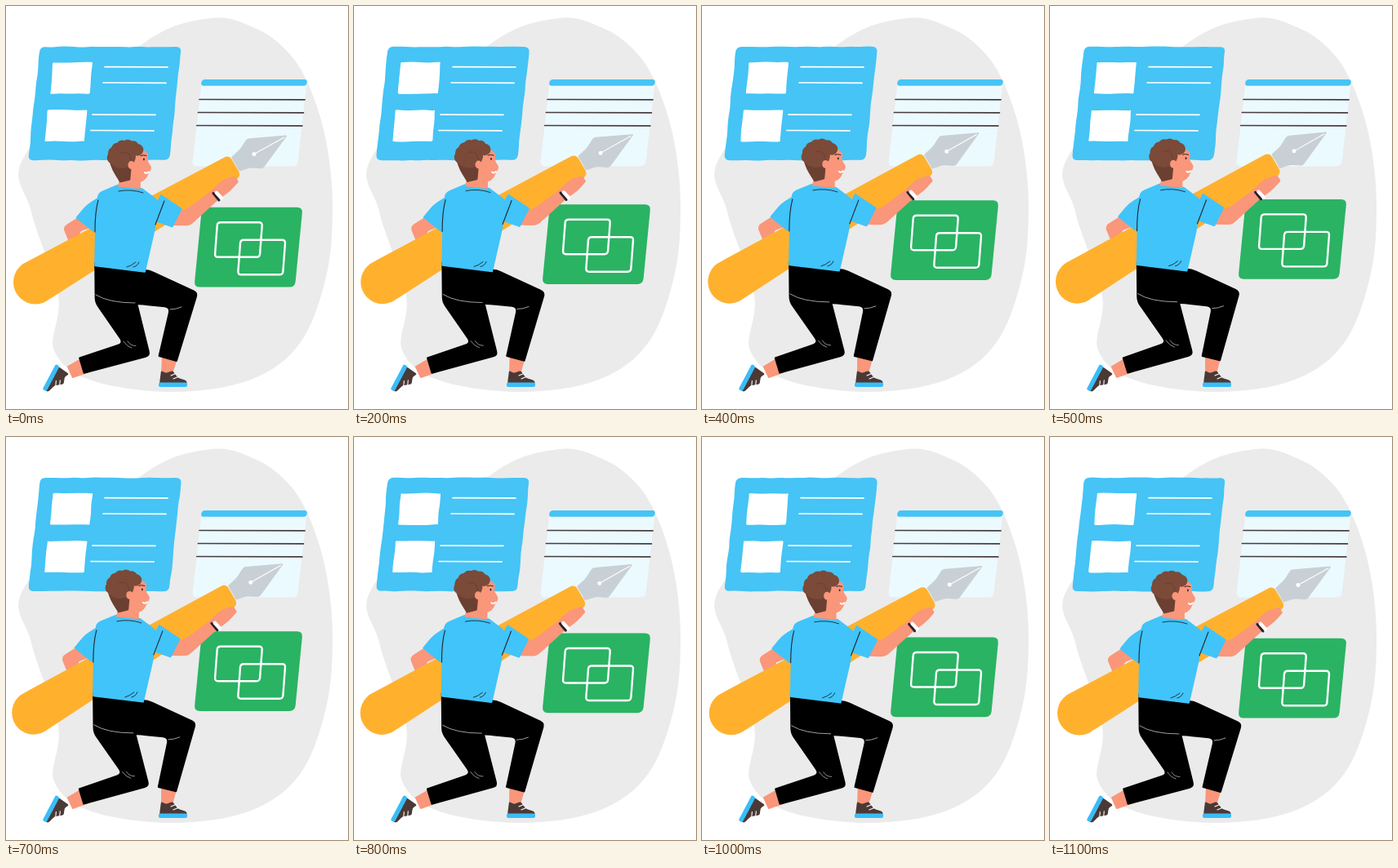
An HTML page with a canvas that plays this animation: 419x494 px, repeating every 1.2 s.

```html
<!DOCTYPE html>
<html lang="en">
<head>
<meta charset="utf-8">
<title>Designer with a giant pen</title>
<style>
  html, body { margin: 0; width: 100%; height: 100%; overflow: hidden; background: #fff; }
  canvas { display: block; width: 419px; height: 494px; }
</style>
</head>
<body>
<canvas id="stage"></canvas>
<script>
const W = 419, H = 494, LOOP = 1200, STEP = 100, TAU = Math.PI * 2;
const C = {
  blob: '#ebebeb', sky: '#45c4f5', shirt: '#40c4fa', paper: '#ebfaff', green: '#2ab363',
  orange: '#ffb12e', steel: '#c9d0d5', skin: '#fa967a', hair: '#7b4a38', nape: '#6b4032',
  ink: '#27222b', rule: '#493b40', shoe: '#4b3936', sole: '#39bdf8', crease: '#b0b0b0'
};
const canvas = document.getElementById('stage');
const ctx = canvas.getContext('2d');
const dpr = window.devicePixelRatio || 1;
canvas.width = W * dpr;
canvas.height = H * dpr;

let sway = 0;

const still = p => p;

// Upper body leans back; the shins bend and the feet stay planted.
function lean([x, y, ...rest]) {
  const w = Math.max(0, Math.min(1, (450 - y) / 50)) * sway;
  return [x - 2.5 * w, y - 1.3 * w, ...rest];
}

function random(seed) {
  return () => {
    seed = (seed * 16807) % 2147483647;
    return seed / 2147483647;
  };
}

const mix = (a, b, f) => [a[0] + (b[0] - a[0]) * f, a[1] + (b[1] - a[1]) * f];
const dist = (a, b) => Math.hypot(b[0] - a[0], b[1] - a[1]) || 1;
const toward = (a, b, r) => mix(a, b, Math.min(r / dist(a, b), .5));

function fill(color) {
  ctx.fillStyle = color;
  ctx.fill();
}

// Polygon with rounded corners; a point may carry its own radius.
function trace(pts, r) {
  const n = pts.length;
  ctx.beginPath();
  pts.forEach((p, i) => {
    const own = p[2] ?? r;
    ctx.lineTo(...toward(p, pts[(i + n - 1) % n], own));
    ctx.quadraticCurveTo(p[0], p[1], ...toward(p, pts[(i + 1) % n], own));
  });
  ctx.closePath();
}

// Smooth closed curve through every point.
function spline(p, color) {
  const n = p.length, at = i => p[(i + n) % n];
  ctx.beginPath();
  ctx.moveTo(...p[0]);
  for (let i = 0; i < n; i++) {
    const [a, b, c, d] = [at(i - 1), at(i), at(i + 1), at(i + 2)];
    ctx.bezierCurveTo(
      b[0] + (c[0] - a[0]) / 6, b[1] + (c[1] - a[1]) / 6,
      c[0] - (d[0] - b[0]) / 6, c[1] - (d[1] - b[1]) / 6, ...c);
  }
  fill(color);
}

// Outline around a chain of joints [x, y, half width] with flat ends.
function limb(joints, color, r = 6, move = lean, end = 1) {
  const j = joints.map(move), last = j.length - 1, left = [], right = [];
  j.forEach((p, i) => {
    let tx = 0, ty = 0;
    for (const k of [i, i + 1]) {
      if (k < 1 || k > last) continue;
      const d = dist(j[k - 1], j[k]);
      tx += (j[k][0] - j[k - 1][0]) / d;
      ty += (j[k][1] - j[k - 1][1]) / d;
    }
    const s = p[2] / Math.hypot(tx, ty), own = i && i < last ? r : end;
    left.push([p[0] + ty * s, p[1] - tx * s, own]);
    right.unshift([p[0] - ty * s, p[1] + tx * s, own]);
  });
  trace([...left, ...right], r);
  fill(color);
}

// Two points give a straight line, three a curve.
function line(pts, color, width, move = still) {
  const [a, b, c] = pts.map(move);
  ctx.beginPath();
  ctx.moveTo(...a);
  if (c) ctx.quadraticCurveTo(...b, ...c); else ctx.lineTo(...b);
  ctx.strokeStyle = color;
  ctx.lineWidth = width;
  ctx.stroke();
}

function oval(x, y, rx, ry, color, move = lean) {
  ctx.beginPath();
  ctx.ellipse(...move([x, y]), rx, ry, 0, 0, TAU);
  fill(color);
}

const slab = (x, y, w, h, skew) => [[x, y], [x + w, y], [x + w + skew, y + h], [x + skew, y + h]];

// Hand-drawn edge: short pieces, each nudged a little.
function rough(pts, color, r, rnd) {
  const out = [], nudge = () => (rnd() - .5) * 1.3;
  pts.forEach((a, i) => {
    const b = pts[(i + 1) % 4], from = toward(a, b, r), to = toward(b, a, r);
    const n = Math.round(dist(from, to) / 10);
    out.push(a);
    for (let k = 0; k <= n; k++) {
      const [x, y] = mix(from, to, k / n);
      out.push([x + nudge(), y + nudge()]);
    }
  });
  trace(out, 99);
  fill(color);
}

function backdrop() {
  spline([[250, 15], [305, 27], [344, 55], [370, 95], [391, 160], [400, 240], [393, 328],
    [361, 412], [300, 458], [205, 473], [105, 459], [59, 422], [64, 355], [31, 252],
    [25, 180], [165, 48]], C.blob);
}

function bluePanel(rnd) {
  rough(slab(42, 50, 173, 139, -15), C.sky, 13, rnd);
  for (const row of [0, 1]) {
    const y = 69 + 58.5 * row, x = 121 - 15 * row;
    rough(slab(57.5 - 6.7 * row, y, 48.5, 38.5, -3.5), '#fff', 2, rnd);
    line([[x, y + 5.6], [x + 77, y + 5.8]], '#fff', 1.7);
    line([[x - 2, y + 25], [x + 75, y + 25.4]], '#fff', 1.7);
  }
}

function paperPanel() {
  trace(slab(240, 90, 129, 106.5, -12), 6);
  fill(C.paper);
  trace(slab(240, 90, 129.5, 7.8, -1.5), 4);
  fill(C.sky);
  for (let i = 0; i < 3; i++) {
    const x = 237 - 1.6 * i, y = 114.5 + 16 * i;
    line([[x, y], [x + 129, y + .4]], C.rule, 1.7);
  }
}

function greenPanel() {
  ctx.save();
  ctx.translate(0, -10.3 * sway);
  trace(slab(240, 247, 123.5, 97.8, -9.5), 7);
  fill(C.green);
  ctx.strokeStyle = '#fff';
  ctx.lineWidth = 2.4;
  for (const k of [0, 1]) {
    trace(slab(259 + 28.3 * k, 265.5 + 21.5 * k, 55, 42.5, -3.2), 4);
    ctx.stroke();
  }
  ctx.restore();
}

function pen() {
  ctx.save();
  ctx.transform(1 - .01 * sway, -.0105 * sway, 0, 1, -2 * sway, -.5 * sway);
  limb([[281, 194, 10], [293, 187, 13], [305, 181, 21], [344, 159, .5]], C.steel, 3, still);
  line([[304, 181.5], [341, 161]], '#fff', 1.1);
  oval(304, 181.5, 2.5, 2.5, '#fff', still);
  oval(36, 338.5, 27, 27, C.orange, still);
  limb([[36, 338.5, 27], [281, 195.5, 15]], C.orange, 7, still, 7);
  ctx.restore();
}

// Side view with the heel at the origin and the toe along +x.
function shoe(x, y, angle) {
  ctx.save();
  ctx.translate(x, y);
  ctx.rotate(angle);
  trace([[1, -4], [3, -20], [9, -17], [17, -20], [24, -11], [34, -8], [35, -4]], 2);
  fill(C.shoe);
  trace(slab(0, -5.5, 35, 5.5, 0), 2);
  fill(C.sole);
  for (const k of [0, 1]) line([[15 + 3 * k, -14 + 4 * k], [21 + 3 * k, -16.5 + 4 * k]], '#fff', 1.1);
  ctx.restore();
}

function legs() {
  limb([[98, 440, 10], [78, 449, 8]], C.skin);
  limb([[201, 428, 10], [197, 450, 7]], C.skin);
  shoe(61, 439, 2.06);
  shoe(187, 467, 0);
  limb([[139.5, 318, 31.5], [134, 360, 25.5], [160, 421, 19], [92, 441, 10.5]], '#000');
  limb([[130, 343, 22], [172, 345, 22], [218, 360.5, 20], [198, 433, 12]], '#000');
  line([[110, 354], [126, 364], [158, 364]], C.crease, .9, lean);
  line([[201, 372], [208, 372], [215, 369]], C.crease, .9, lean);
  for (const k of [0, 5]) line([[144 + k, 411], [148 + k, 417], [154 + k, 419 - k / 2]], C.crease, .8, lean);
}

function frontArm() {
  limb([[203, 259, 10], [222, 260, 10], [256, 232, 7], [270, 220, 8.5], [283, 212, 4]], C.skin);
  line([[254, 229.5], [261, 238]], C.ink, 3, lean);
  line([[258, 229], [264, 235.5]], '#fff', 4.5, lean);
}

function torso() {
  limb([[152, 221, 15], [150, 234, 38], [146, 270, 37], [139.5, 323, 31.5]], C.shirt);
  limb([[124, 238, 9], [109, 253, 14], [96.5, 268.5, 14.3]], C.shirt);
  limb([[182, 246, 17], [210, 260, 13]], C.shirt);
  line([[138, 227], [153, 224], [168, 229]], C.ink, .9, lean);
  line([[113, 238], [109, 253], [109, 277]], C.ink, 1.1, lean);
  line([[194, 239], [188, 255], [183, 268]], C.ink, 1.1, lean);
  for (const k of [0, 8]) line([[148 + k, 320], [153 + k, 319], [159 + k / 2, 314]], C.ink, .9, lean);
}

function head() {
  limb([[153, 204, 12], [151, 223, 14]], C.skin);
  spline([[158, 176], [173, 180], [174, 190], [178, 198], [175, 205], [170, 213], [160, 216],
    [148, 207]].map(lean), C.skin);
  limb([[140, 184, 15], [142, 199, 12], [146, 215, 6.5]], C.nape);
  oval(142, 184, 17, 15, C.hair);
  for (let i = 0; i < 7; i++) {
    const a = TAU * (.5 + .065 * i);
    oval(148 + 17 * Math.cos(a), 186 + 15 * Math.sin(a), 7.3, 7.3, C.hair);
  }
  oval(153.5, 195, 4, 5, C.skin);
  line([[141, 180], [152, 176], [153, 189]], C.nape, 1, lean);
  line([[165, 183.5], [168, 182], [172, 183.5]], C.ink, 1, lean);
  oval(169, 188, .9, 1.4, C.ink);
  line([[170, 204], [172, 206], [175, 203.5]], '#fff', 2, lean);
}

function draw(now) {
  const step = Math.floor((now % LOOP) / STEP);
  sway = (1 - Math.cos((step + .5) / 12 * TAU)) / 2;
  const rnd = random(4211 + step * 7919);

  ctx.setTransform(dpr, 0, 0, dpr, 0, 0);
  ctx.lineCap = ctx.lineJoin = 'round';
  ctx.fillStyle = '#fff';
  ctx.fillRect(0, 0, W, H);

  backdrop();
  bluePanel(rnd);
  paperPanel();
  greenPanel();
  limb([[102, 262, 10], [79, 274, 10], [88, 292, 9]], C.skin);
  pen();
  legs();
  frontArm();
  torso();
  head();
}

const start = performance.now();
function tick() {
  draw(performance.now() - start);
  requestAnimationFrame(tick);
}
tick();
</script>
</body>
</html>
```
